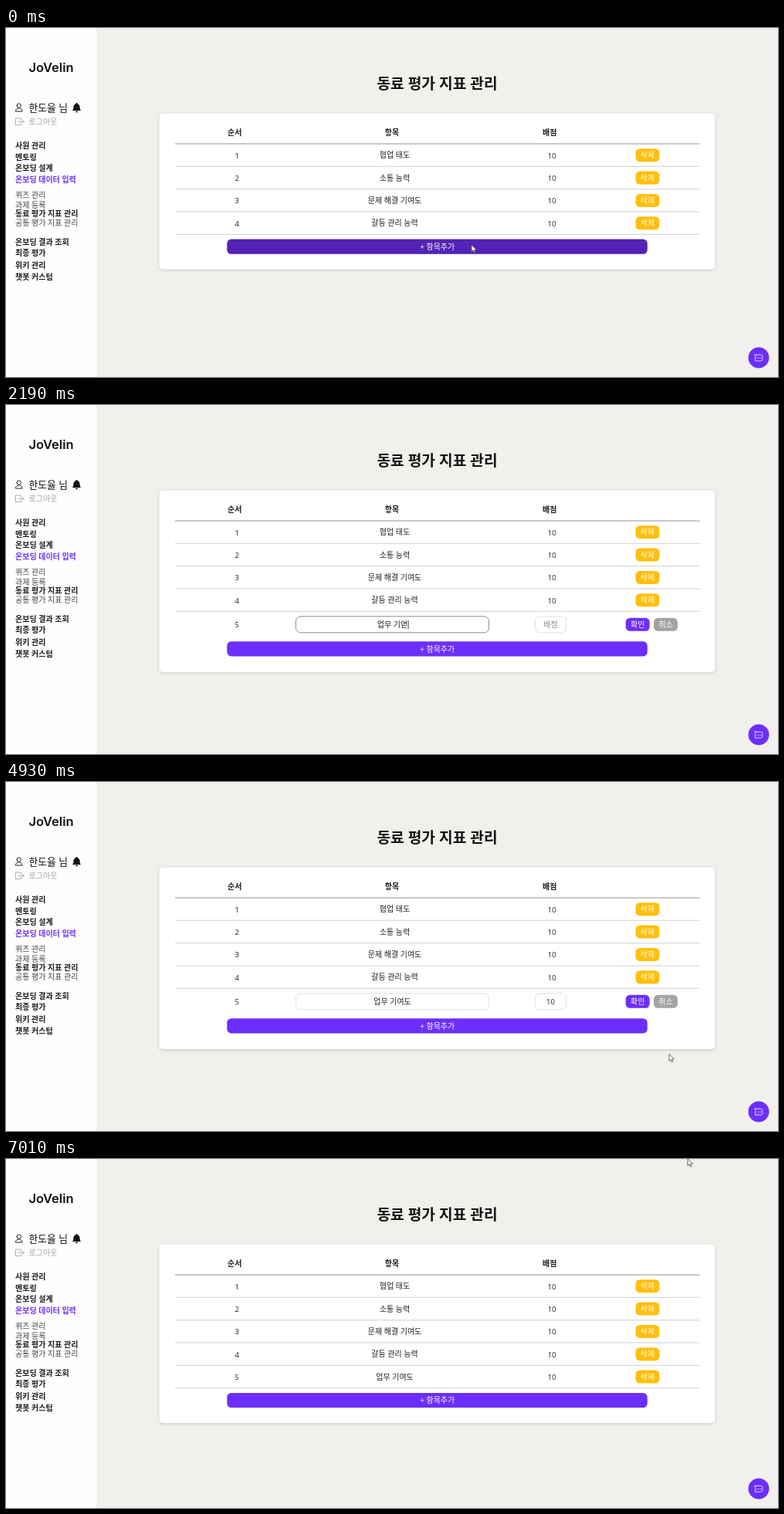
Recreate the animation shown at these times as an HTML page with a canvas. Size 1000x452 px, loop 7.1 s.

```html
<!DOCTYPE html>
<html lang="ko">
<head>
<meta charset="utf-8">
<title>동료 평가 지표 관리</title>
<style>
  html, body { margin: 0; width: 100%; height: 100%; overflow: hidden; background: #f2f0ec; }
  canvas { display: block; width: 1000px; height: 452px; }
</style>
</head>
<body>
<canvas id="stage"></canvas>
<script>
const W = 1000, H = 452, LOOP = 7100;
const FONT = '"Open Sans", "Noto Sans CJK KR", "Noto Sans CJK", sans-serif';
const PURPLE = '#6c2ffb', DARK_PURPLE = '#5322b7', AMBER = '#ffbf0f', INK = '#1c1c1e';

const ROW_OPEN = 190, ITEM_FOCUS = 490, POINT_FOCUS = 2810, SUBMIT = 4560, SAVED = 6270;
const POINTER_HIDE = 1400, POINTER_SHOW = 4050;

const MENU = [
  ['사원 관리', 152, 1], ['멘토링', 167, 1], ['온보딩 설계', 181.5, 1],
  ['온보딩 데이터 입력', 196.5, 1, PURPLE],
  ['퀴즈 관리', 216.5], ['과제 등록', 229], ['동료 평가 지표 관리', 240.5, 1], ['공통 평가 지표 관리', 252.5],
  ['온보딩 결과 조회', 277, 1], ['최종 평가', 291.5, 1], ['위키 관리', 307, 1], ['챗봇 커스텀', 322, 1]
];
const ITEMS = ['협업 태도', '소통 능력', '문제 해결 기여도', '갈등 관리 능력', '업무 기여도'];

// [time, value]: the value holds until the next entry
const ITEM_TYPING = [
  [0, ''], [1110, 'ㅇ'], [1150, '어'], [1330, '에'], [1430, '어'], [1530, '업'], [1620, '업ㅁ'],
  [1710, '업무'], [1800, '업무 '], [1900, '업무 ㄱ'], [1990, '업무 기'],
  [2070, '업무 기여'], [2170, '업무 기엳'], [2270, '업무 기여도']
];
const POINT_TYPING = [[0, ''], [3280, '1'], [3520, '10']];

// [time, x, y] of the pointer tip
const POINTER = [
  [0, 603, 281], [190, 603, 281], [350, 580, 283], [490, 570, 282], [860, 541, 271],
  [4050, 541, 271], [4200, 720, 308], [4320, 818, 307], [4440, 820, 288], [4560, 819, 284],
  [4790, 819, 284], [4930, 859, 353], [5050, 850, 320], [5450, 655, 86], [5560, 641, 69],
  [6270, 641, 69], [6560, 740, 44], [6910, 877, 9], [7010, 883, 0], [7100, 883, 0]
];

const canvas = document.getElementById('stage');
const ctx = canvas.getContext('2d');
const dpr = window.devicePixelRatio || 1;
canvas.width = W * dpr;
canvas.height = H * dpr;

function held(list, t) {
  let value = list[0][1];
  for (const [at, v] of list) if (t >= at) value = v;
  return value;
}

function pointerAt(t) {
  const i = POINTER.findIndex(p => p[0] > t);
  const [t0, x0, y0] = POINTER[i - 1], [t1, x1, y1] = POINTER[i];
  const k = (t - t0) / (t1 - t0);
  return { x: x0 + (x1 - x0) * k, y: y0 + (y1 - y0) * k };
}

// y is the visual middle of the line
function text(str, x, y, { size = 10, weight = 400, color = INK, align = 'center', family = FONT } = {}) {
  ctx.font = `${weight} ${size}px ${family}`;
  ctx.textAlign = align;
  ctx.textBaseline = 'alphabetic';
  ctx.fillStyle = color;
  ctx.fillText(str, x, y + size * 0.37);
  return ctx.measureText(str).width;
}

function box(x, y, w, h, r, fill, stroke) {
  ctx.beginPath();
  ctx.roundRect(x, y, w, h, r);
  if (fill) { ctx.fillStyle = fill; ctx.fill(); }
  if (stroke) { ctx.strokeStyle = stroke; ctx.lineWidth = 1; ctx.stroke(); }
}

function rule(y, color) {
  ctx.fillStyle = color;
  ctx.fillRect(219, y, 679.5, 1.2);
}

function path(d, { fill, stroke, width = 1 }) {
  const p = new Path2D(d);
  if (fill) { ctx.fillStyle = fill; ctx.fill(p); }
  if (stroke) {
    ctx.strokeStyle = stroke;
    ctx.lineWidth = width;
    ctx.lineJoin = ctx.lineCap = 'round';
    ctx.stroke(p);
  }
}

function pill(label, x, y, color) {
  box(x, y - 8.5, 31, 17, 5.5, color);
  text(label, x + 15.5, y, { color: '#fff' });
}

function sidebar() {
  ctx.fillStyle = '#fefefe';
  ctx.fillRect(0, 0, 117.5, H);
  text('JoVelin', 58.5, 51, { size: 16.5, weight: 600, color: '#111', family: 'Inter, sans-serif' });

  path('M14 100.5a2.7 2.7 0 1 0 5.4 0a2.7 2.7 0 1 0-5.4 0M12.3 107.6c0-5 8.8-5 8.8 0z', { stroke: '#222' });
  text('한도율 님', 29.5, 103, { size: 12.8, weight: 500, color: '#111', align: 'left' });
  path('M91.5 97c.9 0 1.2.6 1.2 1.2c2.2.7 2.9 2.4 2.9 4.3c0 2.5.7 3.5 1.5 4.5h-11.2c.8-1 1.5-2 1.5-4.5c0-1.9.7-3.6 2.9-4.3c0-.6.3-1.2 1.2-1.2zM90 107.7h3c0 2-3 2-3 0z', { fill: '#111' });
  path('M19.3 119v-2h-7v8.6h7v-2M15.5 121.3h7.6M21 119.2l2.1 2.1l-2.1 2.1', { stroke: '#a3a3a3', width: 0.9 });
  text('로그아웃', 29.5, 121.3, { color: '#a0a0a0', align: 'left' });

  for (const [label, y, bold, color] of MENU)
    text(label, 12, y, { weight: bold ? 700 : 400, color: color || (bold ? INK : '#444'), align: 'left' });
}

function card(height) {
  ctx.save();
  ctx.shadowColor = 'rgba(0,0,0,.17)';
  ctx.shadowBlur = 4 * dpr;
  ctx.shadowOffsetY = dpr;
  box(198.5, 110.5, 720, height, 5, '#fff');
  ctx.restore();
}

function table(count) {
  for (const [label, x] of [['순서', 296.3], ['항목', 500], ['배점', 704.3]])
    text(label, x, 135.5, { weight: 700 });
  rule(149.4, '#a6a4a6');
  for (let i = 0; i < count; i++) {
    const y = 164.7 + i * 29.35;
    text(i + 1, 299.3, y + 0.3, { size: 9.5 });
    text(ITEMS[i], 503.5, y);
    text('10', 707.3, y + 0.3, { size: 9.5 });
    pill('삭제', 815.5, y, AMBER);
    rule(y + 14, '#d8d8da');
  }
}

function field(x, w, value, hint, focused, caret) {
  const mid = x + w / 2, y = 284.5;
  box(x, 273.8, w, 21, 6, '#fff', focused ? '#8c8c8c' : '#e0e0e4');
  if (!value) text(hint, mid, y, { color: '#8b8b8f' });
  const width = value ? text(value, mid, y, { size: /\d/.test(value) ? 9.5 : 10 }) : 0;
  if (caret) {
    ctx.fillStyle = '#222';
    ctx.fillRect(mid + width / 2 + 0.4, 279, 0.9, 11);
  }
}

function editRow(t, hoverConfirm) {
  const onItem = t >= ITEM_FOCUS && t < POINT_FOCUS;
  const onPoint = t >= POINT_FOCUS && t < SUBMIT;
  text('5', 299.3, 284.8, { size: 9.5 });
  field(375.5, 250, held(ITEM_TYPING, t), '항목', onItem, onItem);
  field(685.5, 40, held(POINT_TYPING, t), '배점', onPoint, onPoint && t < POINTER_SHOW);
  pill('확인', 802.7, 284.3, hoverConfirm ? DARK_PURPLE : PURPLE);
  pill('취소', 839, 284.3, '#a3a3a3');
}

function chatButton() {
  ctx.beginPath();
  ctx.arc(975, 427, 13.5, 0, Math.PI * 2);
  ctx.fillStyle = PURPLE;
  ctx.fill();
  path('M970.4 423.8l-.7-1.4M972 423.3h5.6a2.3 2.3 0 0 1 2.3 2.3v3.2a2.3 2.3 0 0 1-2.3 2.3h-7.2v-5.5a2.3 2.3 0 0 1 1.6-2.3z',
    { stroke: '#eee6ff', width: 0.9 });
  ctx.fillStyle = '#fff';
  for (const x of [972.4, 974.7, 977]) ctx.fillRect(x, 426.8, 1.1, 1.1);
}

function pointer(p, overText) {
  ctx.save();
  ctx.translate(p.x, p.y);
  if (overText) path('M-2 -4.5h4M0 -4.5v9M-2 4.5h4', { stroke: '#333', width: 0.9 });
  else path('M0 0v8.6l2-1.8l1.5 3.2l1.5-.7l-1.5-3.1h2.7z', { fill: '#fff', stroke: '#444', width: 0.8 });
  ctx.restore();
}

function draw(t) {
  const editing = t >= ROW_OPEN && t < SAVED;
  const saved = t >= SAVED;
  const p = pointerAt(t);
  const shown = t < POINTER_HIDE || t >= POINTER_SHOW;
  const inside = (x, y, w, h) => shown && p.x >= x && p.x <= x + w && p.y >= y && p.y <= y + h;
  const addY = editing ? 306.2 : saved ? 302.9 : 273.6;

  ctx.setTransform(dpr, 0, 0, dpr, 0, 0);
  ctx.fillStyle = '#f2f0ec';
  ctx.fillRect(0, 0, W, H);
  sidebar();
  text('동료 평가 지표 관리', 558.5, 71.7, { size: 19.2, weight: 700, color: '#151515' });

  card(editing ? 235.5 : saved ? 231.5 : 202);
  table(saved ? 5 : 4);
  if (editing) editRow(t, inside(802.7, 275.8, 31, 17));

  box(286.3, addY, 544.5, 19.2, 5.5, inside(286.3, addY, 544.5, 19.2) ? DARK_PURPLE : PURPLE);
  text('+ 항목추가', 558.7, addY + 9.7, { color: '#fff' });

  chatButton();
  if (shown) pointer(p, editing && inside(375.5, 274, 250, 21));
}

const start = performance.now();
function frame() {
  draw((performance.now() - start) % LOOP);
  requestAnimationFrame(frame);
}
frame();
</script>
</body>
</html>
```
